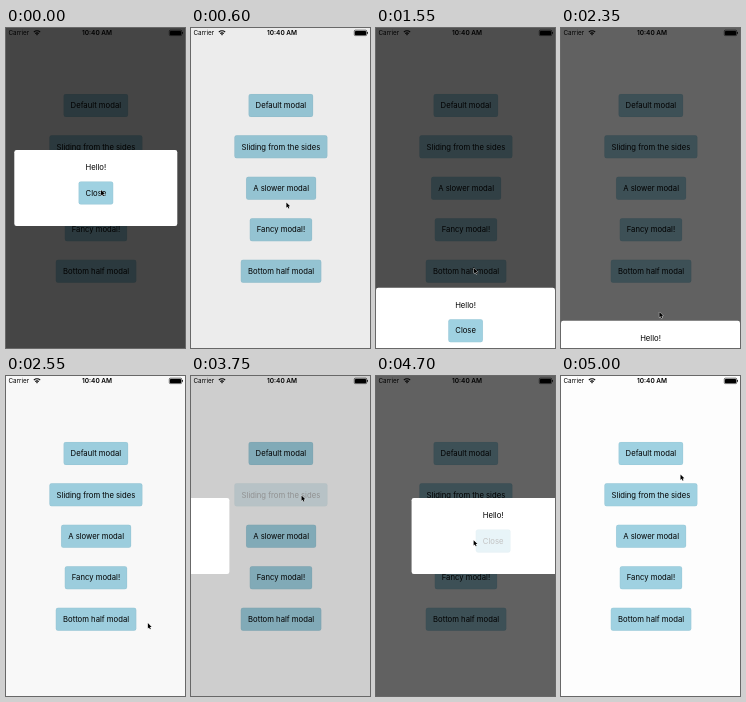
These frames come from a looping animation (179 by 320 pixels, 5050 ms). An HTML page with a canvas:

```html
<!DOCTYPE html>
<html lang="en">
<head>
<meta charset="utf-8">
<title>Modal demo</title>
<style>
html, body { margin: 0; width: 100%; height: 100%; overflow: hidden; background: #fdfdfd; }
canvas { display: block; width: 100vw; height: 100vh; }
</style>
</head>
<body>
<canvas id="stage"></canvas>
<script>
const W = 179, H = 320, LOOP = 5050, STEP = 50;
const PAGE = '#fdfdfd', BLUE = '#9fd1e1', FONT = 'Inter, Roboto, sans-serif';
const canvas = document.getElementById('stage');
const ctx = canvas.getContext('2d');

const buttons = [
  { label: 'Default modal', x: 57.6, y: 65.9, w: 64.5 },
  { label: 'Sliding from the sides', x: 43.4, y: 107.3, w: 93 },
  { label: 'A slower modal', x: 55.1, y: 148.8, w: 70 },
  { label: 'Fancy modal!', x: 58.8, y: 190.2, w: 62.3 },
  { label: 'Bottom half modal', x: 49.8, y: 231.7, w: 80.5 }
];
const BUTTON_H = 23;

const presses = [
  { button: 4, down: 1225, up: 1330 },
  { button: 1, down: 3560, up: 3690 }
];

// from and to are the offsets outside the stage
const centered = { x: 8.3, y: 122, w: 163, h: 76 };
const modals = [
  { box: centered, open: -1000, press: 310, close: 410, from: [0, H], to: [0, H] },
  { box: { x: 0, y: 244, w: W, h: 76 }, open: 1333, press: 2190, close: 2310, from: [0, H], to: [0, H] },
  { box: centered, open: 3695, press: 4540, close: 4660, from: [-W, 0], to: [W, 0] }
];
const SLIDE = 300, BACKDROP = 0.725;

// time, x, y
const cursorPath = [
  [0, 95, 162], [200, 95, 165], [450, 95, 165], [1050, 98, 240], [1600, 98, 240],
  [1950, 96, 286], [2310, 96, 286], [2560, 142, 247], [2650, 142, 247],
  [3350, 110.5, 119.5], [3780, 110.5, 119.5], [4050, 114, 172], [4300, 97, 166],
  [4660, 97, 166], [5000, 119.5, 98.5]
];

const clamp = v => Math.min(1, Math.max(0, v));
const mix = (a, b, k) => a + (b - a) * k;
const inOut = v => { v = clamp(v); return v < 0.5 ? 2 * v * v : 1 - 2 * (1 - v) ** 2; };

// cubic-bezier(.25, .1, .25, 1)
function ease(x) {
  x = clamp(x);
  let lo = 0, hi = 1;
  for (let i = 0; i < 24; i++) {
    const s = (lo + hi) / 2;
    const at = 0.75 * s * (1 - s) + s ** 3;
    if (at < x) lo = s; else hi = s;
  }
  return 0.3 * lo * (1 - lo) ** 2 + 3 * lo * lo * (1 - lo) + lo ** 3;
}

function pressFade(t, down, up) {
  return 0.8 * inOut((t - down) / 150) * (1 - inOut((t - up) / 250));
}

function roundRect(x, y, w, h, r) {
  ctx.beginPath();
  ctx.roundRect(x, y, w, h, r);
}

function text(label, x, y, size, weight = 400, align = 'center') {
  ctx.font = `${weight} ${size}px ${FONT}`;
  ctx.textAlign = align;
  ctx.textBaseline = 'alphabetic';
  ctx.fillStyle = '#000';
  ctx.fillText(label, x, y);
}

function drawButton({ label, x, y, w }, fade, behind) {
  roundRect(x, y, w, BUTTON_H, 2.2);
  ctx.fillStyle = BLUE;
  ctx.fill();
  roundRect(x + 0.25, y + 0.25, w - 0.5, BUTTON_H - 0.5, 2);
  ctx.strokeStyle = 'rgba(0,0,0,.06)';
  ctx.lineWidth = 0.5;
  ctx.stroke();
  text(label, x + w / 2, y + 14.2, 7.7);
  if (fade > 0) {
    ctx.globalAlpha = fade;
    ctx.fillStyle = behind;
    ctx.fillRect(x - 0.5, y - 0.5, w + 1, BUTTON_H + 1);
    ctx.globalAlpha = 1;
  }
}

function drawStatusBar() {
  text('Carrier', 2.5, 7.2, 6.3, 400, 'left');
  text('10:40 AM', 91, 7.2, 6.5, 600);
  ctx.strokeStyle = '#000';
  ctx.lineWidth = 1.05;
  for (const r of [2.4, 4.5]) {
    ctx.beginPath();
    ctx.arc(31, 7.3, r, -Math.PI * 0.75, -Math.PI * 0.25);
    ctx.stroke();
  }
  ctx.beginPath();
  ctx.moveTo(31, 7.6);
  ctx.arc(31, 7.6, 1.4, -Math.PI * 0.75, -Math.PI * 0.25);
  ctx.fill();

  roundRect(163.3, 2.2, 12.4, 5.4, 1);
  ctx.lineWidth = 0.6;
  ctx.stroke();
  roundRect(164, 2.9, 11, 4, 0.5);
  ctx.fill();
  ctx.fillRect(176.2, 4, 0.8, 1.8);
}

function drawModal(modal, t) {
  const { box, open, press, close, from, to } = modal;
  if (t < open || t >= close + SLIDE) return;
  const closing = t >= close;
  const k = ease((t - (closing ? close : open)) / SLIDE);
  const away = closing ? k : 1 - k;
  const side = closing ? to : from;

  ctx.fillStyle = `rgba(0,0,0,${BACKDROP * (1 - away)})`;
  ctx.fillRect(0, 0, W, H);

  ctx.save();
  ctx.translate(box.x + side[0] * away, box.y + side[1] * away);
  roundRect(0, 0, box.w, box.h, 2.2);
  ctx.fillStyle = '#fff';
  ctx.fill();
  const mid = box.w / 2;
  text('Hello!', mid, 20.2, 7.7);
  drawButton({ label: 'Close', x: mid - 17.2, y: 31.4, w: 34.6 }, pressFade(t, press, close), '#fff');
  ctx.restore();
}

function cursorAt(t) {
  const next = cursorPath.findIndex(p => p[0] > t);
  if (next < 0) return cursorPath[cursorPath.length - 1].slice(1);
  const a = cursorPath[next - 1], b = cursorPath[next];
  const k = inOut((t - a[0]) / (b[0] - a[0]));
  return [mix(a[1], b[1], k), mix(a[2], b[2], k)];
}

function drawCursor(t) {
  ctx.save();
  ctx.translate(...cursorAt(t));
  ctx.beginPath();
  [[0, 0], [0, 5.4], [1.2, 4.3], [2.1, 6.2], [3, 5.8], [2.1, 3.9], [3.8, 3.8]]
    .forEach(p => ctx.lineTo(...p));
  ctx.closePath();
  ctx.strokeStyle = 'rgba(255,255,255,.8)';
  ctx.lineWidth = 0.9;
  ctx.lineJoin = 'round';
  ctx.stroke();
  ctx.fillStyle = '#000';
  ctx.fill();
  ctx.restore();
}

function draw(t) {
  ctx.fillStyle = PAGE;
  ctx.fillRect(0, 0, W, H);
  drawStatusBar();
  buttons.forEach((button, i) => {
    const press = presses.find(p => p.button === i);
    drawButton(button, press ? pressFade(t, press.down, press.up) : 0, PAGE);
  });
  modals.forEach(modal => drawModal(modal, t));
  drawCursor(t);
}

function resize() {
  const ratio = window.devicePixelRatio || 1;
  canvas.width = Math.round(innerWidth * ratio);
  canvas.height = Math.round(innerHeight * ratio);
  ctx.setTransform(canvas.width / W, 0, 0, canvas.height / H, 0, 0);
}

const start = performance.now();
function tick() {
  const t = (performance.now() - start) % LOOP;
  draw(Math.floor(t / STEP) * STEP);
  requestAnimationFrame(tick);
}

addEventListener('resize', resize);
resize();
tick();
</script>
</body>
</html>
```
